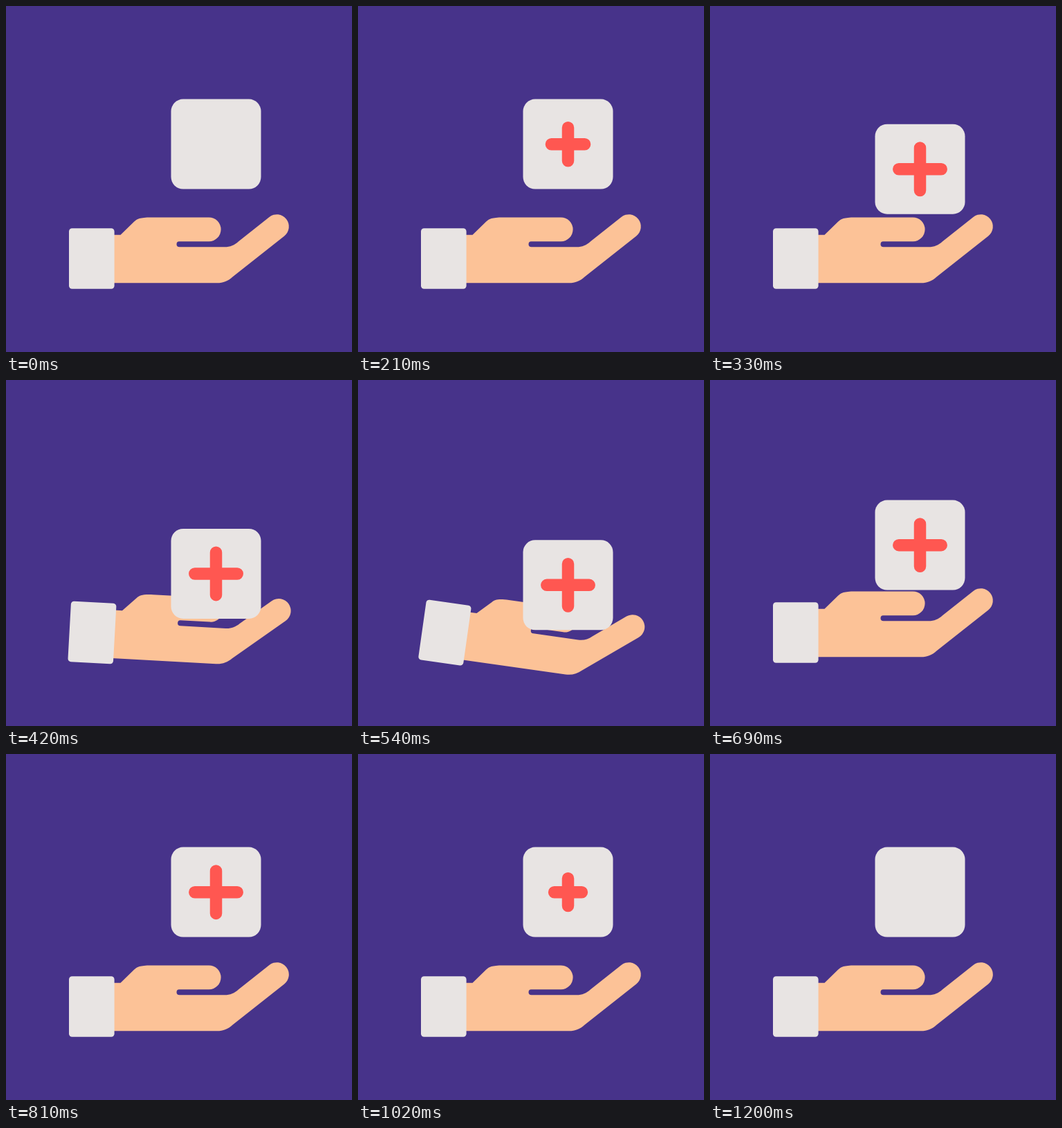
These frames come from a looping animation (500x500 px, 1.26 s). An HTML page:

```html
<!DOCTYPE html>
<html lang="en">
<head>
<meta charset="utf-8">
<title>Care in hand</title>
<style>
  html, body { margin: 0; height: 100%; overflow: hidden; background: #47338a; }
  svg { display: block; width: 100%; height: 100%; }
</style>
</head>
<body>
<svg viewBox="0 0 500 500">
  <g id="hand">
    <path fill="#fcc297" d="M150 330.8H165.5L185 311.8C189 307.5 194 305.4 209 305.4H293.2
      A17.4 17.4 0 0 1 293.2 340.2H250.2Q246.5 340.2 246.5 344.2Q246.5 348.3 250.7 348.3H316
      C324 348.3 330 345.6 336 340.2L380.5 304.9A17.5 17.5 0 0 1 402.1 332.5L328 391
      C321 397.4 314 400.3 305 400.3H150Z"/>
    <rect x="91" y="321.2" width="65.6" height="87.6" rx="4.5" fill="#e8e4e3"/>
  </g>
  <g id="box">
    <rect x="238.5" y="134.6" width="130" height="130" rx="17.5" fill="#e8e4e3"/>
    <path id="plus" fill="none" stroke="#ff5751" stroke-width="17.5" stroke-linecap="round"/>
  </g>
</svg>
<script>
const LOOP = 1260, STEP = 30;
const [hand, box, plus] = ['hand', 'box', 'plus'].map(id => document.getElementById(id));

// Easing curve with handles (p, 0) and (1 - p, 1)
function ease(x, p = 1 / 3) {
  let lo = 0, hi = 1;
  for (let i = 0; i < 24; i++) {
    const s = (lo + hi) / 2, r = 1 - s;
    if (3 * p * s * r * r + 3 * (1 - p) * s * s * r + s ** 3 < x) lo = s; else hi = s;
  }
  return lo * lo * (3 - 2 * lo);
}

const progress = (t, from, to) => Math.min(1, Math.max(0, (t - from) / (to - from)));

function draw(t) {
  const drop = t < 510 ? ease(progress(t, 210, 510)) : 1 - ease(progress(t, 510, 810), 1 / 6);
  const tilt = ease(progress(t, 360, 510)) - ease(progress(t, 510, 660));
  const arm = 30.7 * (ease(progress(t, 0, 300)) - ease(progress(t, 900, 1200)));

  box.setAttribute('transform', `translate(0 ${102.4 * drop})`);
  hand.setAttribute('transform', `rotate(${9 * tilt} 124 376.5)`);
  plus.setAttribute('d', arm > 0.01
    ? `M${303.5 - arm} 199.7h${2 * arm}M303.5 ${199.7 - arm}v${2 * arm}` : '');
}

const start = performance.now();
function tick() {
  const t = (performance.now() - start) % LOOP;
  draw(Math.floor(t / STEP) * STEP);
  requestAnimationFrame(tick);
}
tick();
</script>
</body>
</html>
```
